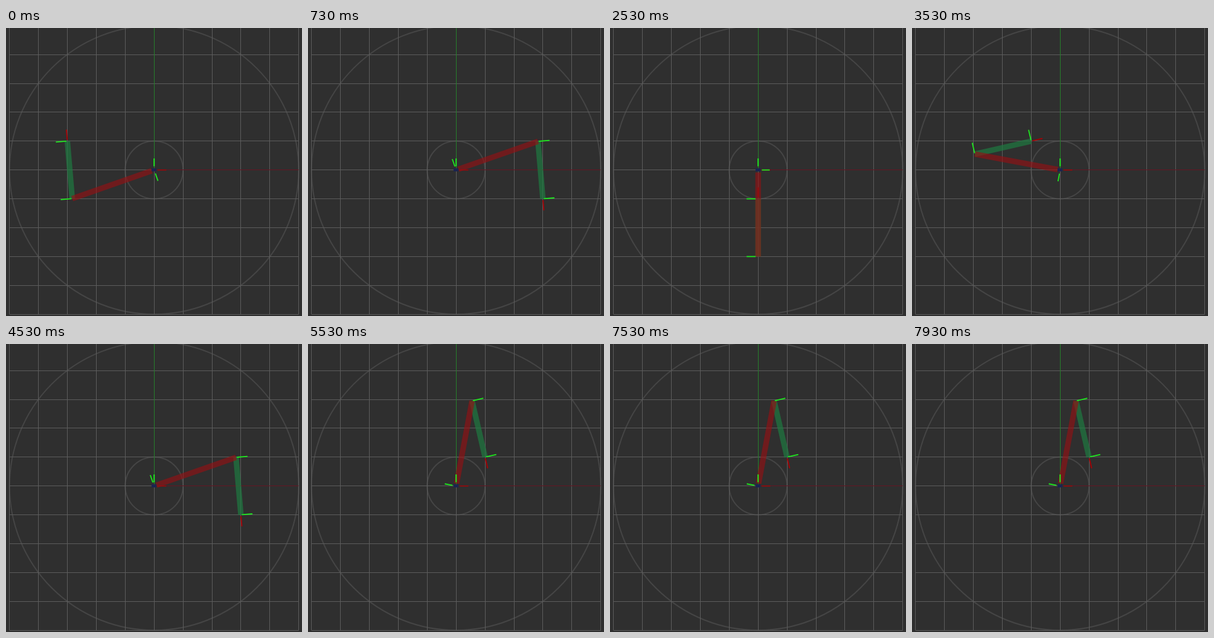
Recreate the animation shown at these times as an HTML page with a canvas. Size 480x468 px, loop 8000 ms.

```html
<!DOCTYPE html>
<html>
<head>
<meta charset="utf-8">
<style>
  html, body { margin: 0; width: 100%; height: 100%; overflow: hidden; background: #2f2f2f; }
  canvas { display: block; }
</style>
</head>
<body>
<canvas id="stage" width="480" height="468"></canvas>
<script>
const ctx = document.getElementById('stage').getContext('2d');
const LOOP = 8000, FIRST_SWITCH = 530, HOLD = 1000;
const UNIT = 46.9, UPPER = 3, LOWER = 2;
const BASE = { x: 240.2, y: 230.7 };
const GREEN = '#1fe81f', RED = '#a00508';

// Goals for the arm's tip, in grid units with y up
const goals = [[-3, 1], [3, -1], [-2, 1], [0, -1], [-1, 1], [3, -1], [1, 1], [2, -1], [1, 1]];

function line(x1, y1, x2, y2, color, width) {
  ctx.strokeStyle = color;
  ctx.lineWidth = width;
  ctx.beginPath();
  ctx.moveTo(x1, y1);
  ctx.lineTo(x2, y2);
  ctx.stroke();
}

function along(p, angle, dist) {
  return { x: p.x + dist * Math.cos(angle), y: p.y - dist * Math.sin(angle) };
}

function ray(p, angle, from, to, color, width) {
  const a = along(p, angle, from), b = along(p, angle, to);
  line(a.x, a.y, b.x, b.y, color, width);
}

function circle(radius) {
  ctx.strokeStyle = '#454545';
  ctx.lineWidth = 2;
  ctx.beginPath();
  ctx.arc(BASE.x, BASE.y, radius * UNIT, 0, 2 * Math.PI);
  ctx.stroke();
}

function drawGrid() {
  ctx.fillStyle = '#2f2f2f';
  ctx.fillRect(0, 0, 480, 468);
  circle(5);
  circle(1);
  const far = 5 * UNIT;
  for (let k = -5; k <= 5; k++) {
    const x = Math.floor(BASE.x + k * UNIT) + 0.5;
    const y = Math.floor(BASE.y + k * UNIT) + 0.5;
    line(x, 0, x, BASE.y + far, '#5c5c5c', 1);
    line(BASE.x - far, y, BASE.x + far, y, '#5c5c5c', 1);
  }
  line(240.5, 0, 240.5, BASE.y, '#267f2b', 1);
  line(BASE.x, 230.5, BASE.x + far, 230.5, '#651522', 1);
}

// Two-link inverse kinematics
function solve([x, y]) {
  const d = Math.hypot(x, y);
  const c = (UPPER ** 2 + d * d - LOWER ** 2) / (2 * UPPER * d);
  const bend = Math.acos(Math.min(1, c));
  const a1 = Math.atan2(y, x) + bend;
  const a2 = Math.atan2(y - UPPER * Math.sin(a1), x - UPPER * Math.cos(a1));
  return { a1, a2, folded: bend < 0.01 };
}

function drawArm({ a1, a2, folded }) {
  const quarter = Math.PI / 2, axis = 0.4 * UNIT;
  const elbow = along(BASE, a1, UPPER * UNIT);
  const tip = along(elbow, a2, LOWER * UNIT);
  const gap = folded ? 4 : 1.5;

  ray(elbow, a2, 0, LOWER * UNIT, 'rgba(30,125,65,0.68)', 9);
  ray(tip, a2, 2, axis, RED, 2);
  ray(BASE, 0, 6, axis + 1, RED, 1.6);
  ray(BASE, a1, 4, UPPER * UNIT, 'rgba(150,15,18,0.62)', 9);

  ctx.fillStyle = '#1b2450';
  ctx.fillRect(236, 228, 8, 5);
  ray(BASE, quarter, 6, axis, GREEN, 2);
  ray(BASE, a1 + quarter, 6, axis, GREEN, 1.8);
  ray(elbow, a2 + quarter, gap, axis, GREEN, 1.8);
  ray(tip, a2 + quarter, gap, axis, GREEN, 1.8);
}

function frame(now) {
  const t = now % LOOP;
  const step = Math.floor((t - FIRST_SWITCH + HOLD) / HOLD);
  drawGrid();
  drawArm(solve(goals[step]));
  requestAnimationFrame(frame);
}

frame(0);
</script>
</body>
</html>
```
